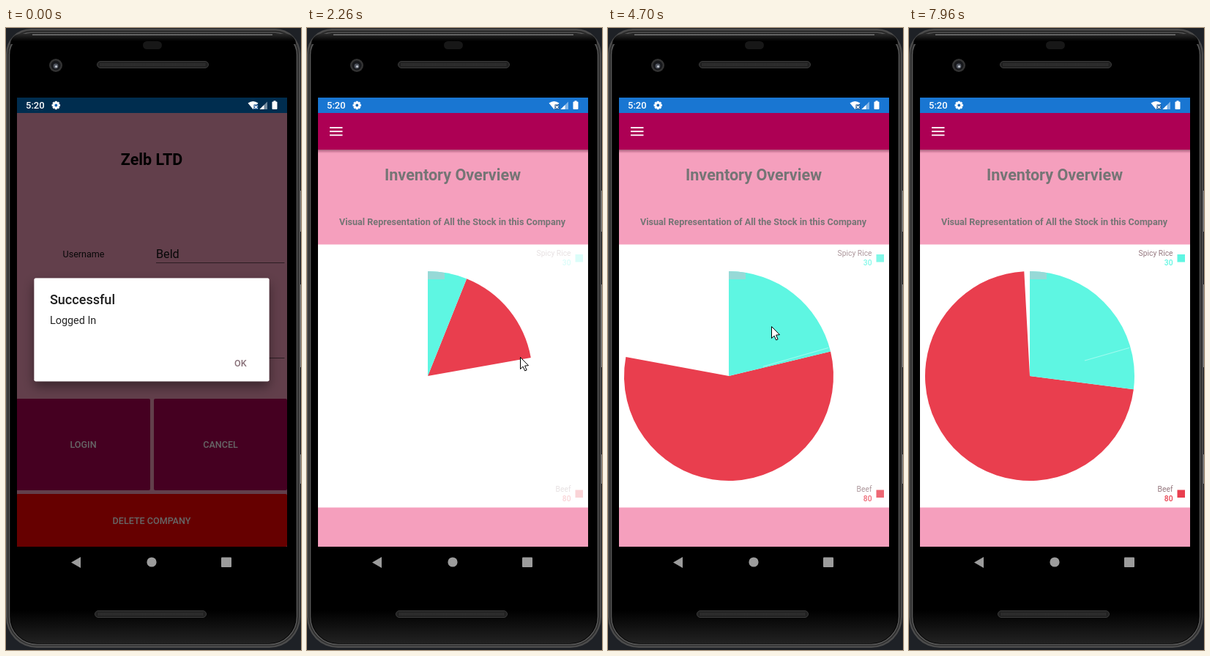
Animation, 403 px wide and 849 px high, one loop 8 s. Source, as an HTML page with a canvas:

```html
<!DOCTYPE html>
<html lang="en">
<head>
<meta charset="utf-8">
<title>Stock app</title>
<style>
html, body { margin: 0; width: 100%; height: 100%; overflow: hidden; background: #1e2126; }
canvas { display: block; width: 100vw; height: 100vh; }
</style>
</head>
<body>
<canvas id="stage"></canvas>
<script>
const W = 403, H = 849, LOOP = 8000, TICK = 68, FIRST = 1360, SLIDE = 1697;
const PINK = '#f59fbd', PLUM = '#ad0054', TEAL = '#5ef6e2', RED = '#e93e4e';
const PIE = { x: 165, y: 475, r: 143 };

// Cube root of the part of the pie still to be drawn
const PIE_KEYS = [[1678, 1], [1910, .9675], [2940, .8235], [3960, .6934], [5510, .5074], [7960, .205]];
const MOUSE_X = [[750, 371], [890, 306], [1030, 307], [2190, 308], [2500, 223], [7500, 223], [7800, 369]];
const MOUSE_Y = [[750, 449], [890, 457], [1030, 459], [2190, 459], [2500, 407], [7500, 407], [7800, 849]];

const canvas = document.getElementById('stage');
const c = canvas.getContext('2d');

function resize() {
  const k = window.devicePixelRatio || 1;
  canvas.width = Math.round(innerWidth * k);
  canvas.height = Math.round(innerHeight * k);
}
addEventListener('resize', resize);
resize();

const clamp = v => Math.max(0, Math.min(1, v));

function track(keys, t) {
  if (t <= keys[0][0]) return keys[0][1];
  for (let i = 1; i < keys.length; i++) {
    const [a, va] = keys[i - 1], [b, vb] = keys[i];
    if (t <= b) return va + (vb - va) * (t - a) / (b - a);
  }
  return keys[keys.length - 1][1];
}

function rect(x, y, w, h, fill) {
  c.fillStyle = fill;
  c.fillRect(x, y, w, h);
}

function round(x, y, w, h, r, fill, stroke, lw = 1) {
  c.beginPath();
  c.roundRect(x, y, w, h, r);
  if (fill) { c.fillStyle = fill; c.fill(); }
  if (stroke) { c.strokeStyle = stroke; c.lineWidth = lw; c.stroke(); }
}

function disc(x, y, r, fill) {
  c.beginPath();
  c.arc(x, y, r, 0, 7);
  c.fillStyle = fill;
  c.fill();
}

function poly(pts, fill) {
  c.beginPath();
  for (let i = 0; i < pts.length; i += 2) c.lineTo(pts[i], pts[i + 1]);
  c.closePath();
  c.fillStyle = fill;
  c.fill();
}

function text(str, x, y, size, fill, weight = 400, align = 'left') {
  c.font = `${weight} ${size}px Roboto, sans-serif`;
  c.textAlign = align;
  c.fillStyle = fill;
  c.fillText(str, x, y);
}

function fade(y0, y1, from, to) {
  const g = c.createLinearGradient(0, y0, 0, y1);
  g.addColorStop(0, from);
  g.addColorStop(1, to);
  return g;
}

function speaker(x, y) {
  round(x + .5, y + .5, 152, 9, 4.5, '#222', '#3b3b3b');
  c.setLineDash([1, 1]);
  c.strokeStyle = '#343434';
  c.lineWidth = 4;
  c.beginPath();
  c.moveTo(x + 5, y + 5);
  c.lineTo(x + 148, y + 5);
  c.stroke();
  c.setLineDash([]);
}

function phone() {
  rect(0, 0, W, H, '#1e2126');
  for (const [y, h] of [[66, 8], [230, 10], [590, 8]]) rect(0, y, 2, h, '#555');
  for (const [y, h] of [[222, 56], [350, 113], [582, 40]]) rect(400, y, 3, h, '#8b8b8b');
  round(0, 1, 402, 845, [34, 34, 42, 42], '#4c4c4c');
  round(2, 3.5, 398, 840, [32, 32, 40, 40], '#2b2b2b');
  round(4.5, 6.5, 393, 835, [30, 30, 38, 38], '#000', '#585858', 1.5);
  round(6, 8, 390, 14, [29, 29, 0, 0], fade(8, 18, '#2a2a2a', '#000'));
  round(6, 790, 390, 50, [0, 0, 37, 37], fade(795, 840, '#000', '#222'));
  rect(36, 8.5, 328, 1.5, '#777');
  round(187, 18, 26, 11, 5.5, '#171717');
  disc(68, 51, 9, '#333');
  disc(68, 51, 6.5, '#17181b');
  disc(68, 52, 3.4, '#50555f');
  disc(68.5, 52.5, 1.6, '#c4c8d0');
  speaker(124, 45);
  speaker(121, 795);
  poly([89, 729.5, 102, 722, 102, 737], '#9c9c9c');
  disc(199, 729, 6.6, '#9c9c9c');
  round(294, 722.5, 14, 13.5, 1, '#9c9c9c');
}

function slice(from, to, fill) {
  c.beginPath();
  c.moveTo(PIE.x, PIE.y);
  c.arc(PIE.x, PIE.y, PIE.r, from - Math.PI / 2, to - Math.PI / 2);
  c.closePath();
  c.fillStyle = fill;
  c.fill();
}

function legend(name, value, y, fill) {
  text(name, 360.5, y + 2, 10.3, '#95787f', 400, 'right');
  text(value, 360.5, y + 15, 10.3, fill, 500, 'right');
  rect(366.5, y, 10.5, 10.5, fill);
}

function overview(t) {
  rect(15, 116, 369, 592, PINK);
  rect(15, 166, 369, 5, fade(166, 171, 'rgba(60,0,30,.4)', 'rgba(60,0,30,0)'));
  rect(15, 116, 369, 50, PLUM);
  for (const y of [135.2, 140.3, 145.4]) rect(31, y, 17.5, 1.8, '#fff');
  text('Inventory Overview', 199, 207.5, 21.6, '#757575', 700, 'center');
  text('Visual Representation of All the Stock in this Company', 198.5, 268.5, 12.62, '#757575', 700, 'center');
  rect(15, 295.5, 369, 359, '#fff');

  const part = 1 - track(PIE_KEYS, t) ** 3;
  const end = part * Math.PI * 2, split = end * 30 / 110;
  const early = t < 1950;
  if (part > 0) {
    slice(split, end, early ? '#85335a' : RED);
    slice(0, split, early ? '#9adcdc' : TEAL);
    if (!early) {
      c.save();
      c.beginPath();
      c.arc(PIE.x, PIE.y, PIE.r, 0, 7);
      c.clip();
      rect(165, 332, 23, 11, '#97d9d7');
      c.restore();
    }
  }
  if (split > 1.33) {
    c.strokeStyle = 'rgba(255,255,255,.4)';
    c.lineWidth = 1.3;
    c.beginPath();
    c.moveTo(t < 6000 ? 212 : 240, t < 6000 ? 462 : 454);
    c.lineTo(301, 436.5);
    c.stroke();
  }
  c.globalAlpha = part;
  legend('Spicy Rice', '30', 309, TEAL);
  legend('Beef', '80', 630.5, RED);
  c.globalAlpha = 1;
}

function button(label, x, y, w, h, fill, base) {
  round(x, y, w, h, 2, fill);
  text(label, x + w / 2, base, 12.57, '#fff', 500, 'center');
}

function login(t) {
  const drop = 592 * clamp((t - SLIDE) / 347) ** 2;
  if (drop >= 592) return;
  c.save();
  c.translate(0, drop);
  rect(15, 116, 369, 592, PINK);
  text('Zelb LTD', 199, 187, 21.5, '#000', 700, 'center');
  text('Username', 77.5, 313.3, 12.57, '#111');
  text('Beld', 205, 313.5, 16.2, '#111');
  text('Password', 77.5, 443.3, 12.57, '#111');
  for (let i = 0; i < 4; i++) disc(208.3 + i * 5.5, 438, 2, '#111');
  rect(205, 320, 175.5, 1, '#6f4a57');
  rect(205, 450, 175.5, 1, '#6f4a57');
  button('LOGIN', 14, 506, 183, 125, PLUM, 573.3);
  button('CANCEL', 202, 506, 182, 125, PLUM, 573.3);
  button('DELETE COMPANY', 14, 636, 370, 72, '#f00', 676.5);
  c.restore();
}

function dialog(t) {
  const alpha = 1 - clamp((t - 1473) / 230);
  if (!alpha) return;
  const card = [38.5, 341.5, 321, 140.8];
  c.globalAlpha = alpha;
  // The shadow is painted outside the card only
  c.save();
  c.beginPath();
  c.rect(15, 116, 369, 592);
  c.rect(...card);
  c.clip('evenodd');
  c.shadowColor = 'rgba(0,0,0,.42)';
  c.shadowBlur = 16;
  c.shadowOffsetY = 7;
  round(...card, 2, '#fff');
  c.restore();
  round(...card, 2, '#fff');
  // Text lies on the half-clear card, so it fades more slowly
  c.globalAlpha = Math.sqrt(alpha);
  text('Successful', 60, 376.5, 18, '#1f1f1f', 500);
  text('Logged In', 60, 404.3, 14.4, '#242424');
  text('OK', 312, 462, 12.57, t < FIRST ? '#887078' : '#a01048', 500);
  c.globalAlpha = 1;
}

function status() {
  text('5:20', 27, 110.3, 13, '#fff', 500);
  c.save();
  c.translate(68.3, 105.5);
  for (let i = 0; i < 4; i++) {
    rect(-1.5, -5.7, 3, 11.4, '#fff');
    c.rotate(Math.PI / 4);
  }
  disc(0, 0, 4.4, '#fff');
  disc(0, 0, 1.9, '#1768b8');
  c.restore();

  c.beginPath();
  c.moveTo(337.5, 111);
  c.lineTo(330.5, 102.5);
  c.quadraticCurveTo(337.5, 97.5, 344.5, 102.5);
  c.closePath();
  c.fillStyle = '#fff';
  c.fill();
  rect(338.5, 104.5, 6, 6.5, '#17518f');
  c.strokeStyle = '#fff';
  c.lineWidth = 1.2;
  c.beginPath();
  c.moveTo(339.5, 106);
  c.lineTo(343.5, 110);
  c.moveTo(343.5, 106);
  c.lineTo(339.5, 110);
  c.stroke();

  poly([346.5, 111, 357, 111, 357, 100.5], 'rgba(255,255,255,.45)');
  poly([346.5, 111, 352.5, 111, 352.5, 105], '#fff');
  round(363.5, 100.5, 7, 10.5, 1, '#fff');
  rect(365.5, 99.3, 3, 2, '#fff');
}

function pointer(x, y) {
  c.save();
  c.translate(x + .5, y + .5);
  c.beginPath();
  for (const [px, py] of [[0, 0], [0, 16], [3.6, 12.6], [6.2, 18.4], [8.6, 17.4], [6.1, 11.6], [11, 11.2]]) c.lineTo(px, py);
  c.closePath();
  c.fillStyle = '#fff';
  c.strokeStyle = '#000';
  c.lineWidth = 1;
  c.fill();
  c.stroke();
  c.restore();
}

function draw(now) {
  const ms = now % LOOP;
  const t = ms < FIRST ? ms : FIRST + Math.floor((ms - FIRST + 5) / TICK) * TICK + 8;
  c.setTransform(canvas.width / W, 0, 0, canvas.height / H, 0, 0);
  phone();

  c.save();
  c.beginPath();
  c.rect(15, 95, 369, 613);
  c.clip();
  rect(15, 95, 369, 21, t < SLIDE ? '#0071c6' : '#1976d2');
  overview(t);
  login(t);
  const dim = .6 * (1 - clamp((t - 1472) / 415));
  rect(15, 95, 369, 613, `rgba(0,0,0,${dim})`);
  dialog(t);
  status();
  c.restore();

  if (ms >= 290 && ms < 340) pointer(361, 829);
  else if (ms >= 750 && ms < 7850) pointer(Math.round(track(MOUSE_X, t)), Math.round(track(MOUSE_Y, t)));
}

const start = performance.now();
function loop() {
  draw(performance.now() - start);
  requestAnimationFrame(loop);
}
loop();
</script>
</body>
</html>
```
